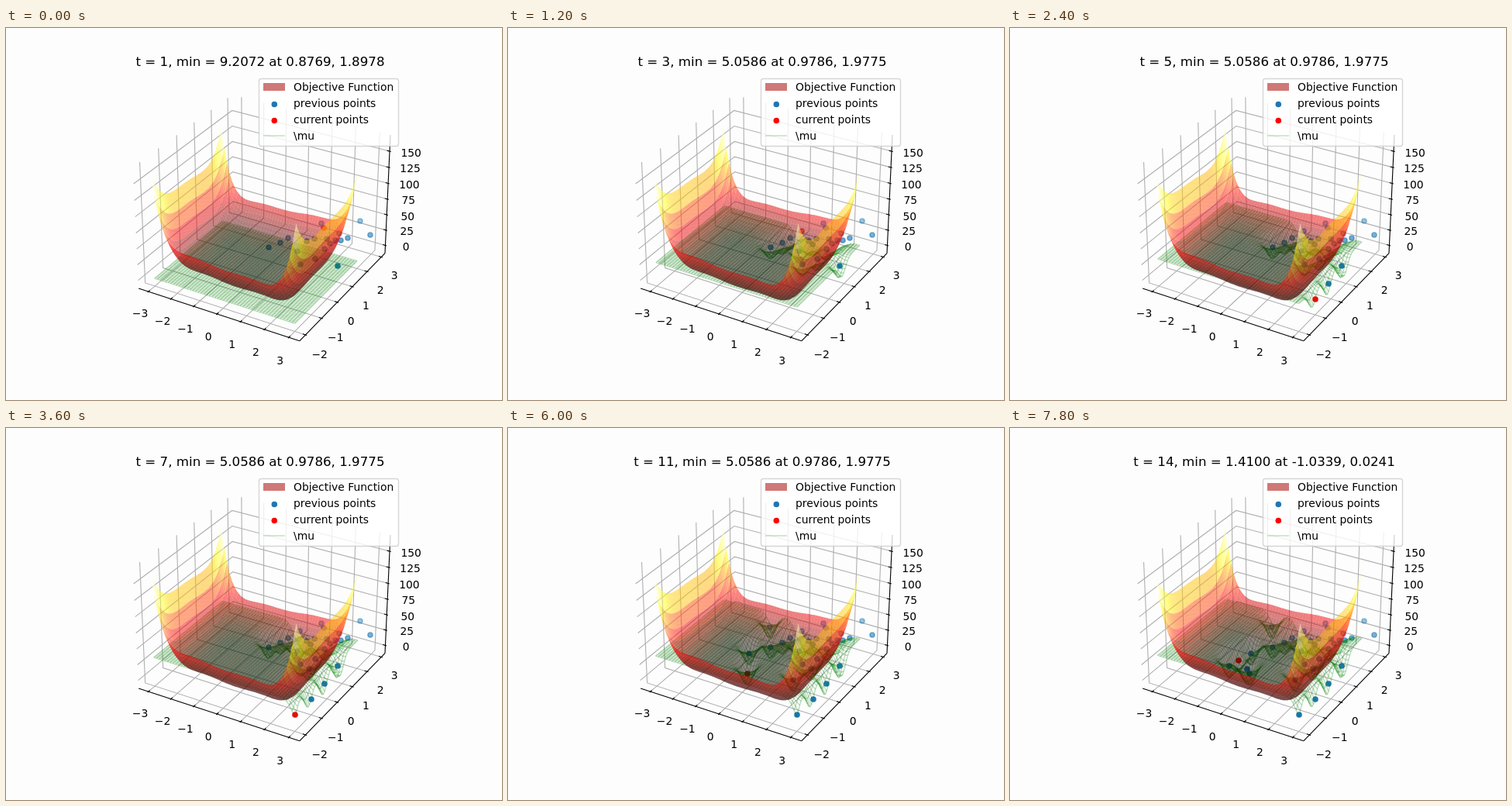
These frames come from a looping animation (640 by 480 pixels, 8 s). An HTML page with a canvas:

```html
<!DOCTYPE html>
<html lang="en">
<head>
<meta charset="utf-8">
<title>Surface search</title>
<style>
  html, body { margin: 0; width: 100%; height: 100%; overflow: hidden; background: #fdfdfd; }
  canvas { display: block; width: 640px; height: 480px; }
</style>
</head>
<body>
<canvas id="stage" width="640" height="480"></canvas>
<script>
const STEP = 600, LOOP = 8000, N = 50;
const FONT = '"DejaVu Sans", sans-serif';
const BLUE = '#1f77b4', RED = '#ff0000', GREEN = 'rgba(0,128,0,.26)';

// Box limits in data units, and data-to-box scale
const X0 = -3.4375, X1 = 3.4375, Y0 = -2.361, Y1 = 3.261, Z0 = -13, Z1 = 174.9;
const SX = 0.17316, SY = 0.2117, SZ = 0.004753, YC = 0.45, ZC = 80.9;
const CX = 333, CY = 237.4, ZOOM = 1997.8;

// Screen positions of the samples: the first set, then one per step
const first = [
  [339, 283], [354, 277], [364, 271], [380, 305], [376, 288], [388, 275], [399, 298],
  [407, 252], [411, 285], [414, 272], [418, 278], [425, 274], [430, 265], [398, 272],
  [432, 274], [441, 271], [457, 249], [470, 267], [428, 307]
];
const added = [
  [410, 258], [393, 279], [379, 262], [411, 330], [394, 350], [391, 311], [373, 370],
  [368, 325], [311, 291], [338, 257], [309, 317], [306, 311], [283, 307], [295, 300]
];

// Perspective view: elevation 30, azimuth -60
function project(x, y, z) {
  const a = x * SX, b = (y - YC) * SY, c = (z - ZC) * SZ;
  const d = 10 - (0.433 * a - 0.75 * b + 0.5 * c);
  return [
    CX + ZOOM * (0.866 * a + 0.5 * b) / d,
    CY - ZOOM * (-0.25 * a + 0.433 * b + 0.866 * c) / d,
    d
  ];
}

// Data x, y of a screen point lying on the plane of height z
function unproject([px, py], z) {
  const X = (px - CX) / ZOOM, Y = (CY - py) / ZOOM, c = (z - ZC) * SZ;
  const m = 0.866 + 0.433 * X, n = 0.5 - 0.75 * X, p = X * (10 - 0.5 * c);
  const q = -0.25 + 0.433 * Y, r = 0.433 - 0.75 * Y, s = Y * (10 - 0.5 * c) - 0.866 * c;
  const det = m * r - n * q;
  return [(p * r - n * s) / det / SX, (m * s - p * q) / det / SY + YC];
}

const camel = (x, y) =>
  (4 - 2.1 * x * x + x ** 4 / 3) * x * x + x * y + (4 * y * y - 4) * y * y;

const gx = i => -3 + 6 * i / N;
const gy = j => -2 + 4 * j / N;
const clamp = (v, lo = 0, hi = 1) => Math.min(hi, Math.max(lo, v));

// Black - red - yellow - white ramp
function hot(v) {
  const r = clamp(0.0416 + v * 2.624), g = clamp((v - 0.365) / 0.381), b = clamp((v - 0.746) / 0.254);
  return `rgb(${[r, g, b].map(k => Math.round(k * 255))})`;
}

function layer(draw) {
  const c = document.createElement('canvas');
  c.width = 640;
  c.height = 480;
  draw(c.getContext('2d'));
  return c;
}

function line(g, pts) {
  g.beginPath();
  pts.forEach(p => g.lineTo(p[0], p[1]));
  g.stroke();
}

function label(g, text, x, y, size = 13.89, align = 'center') {
  g.font = `${size}px ${FONT}`;
  g.textAlign = align;
  g.fillStyle = '#000';
  g.fillText(text, x, y);
}

// Translucent dots show a darker rim where fill and outline overlap
function dot(g, x, y, color, alpha = 1) {
  g.globalAlpha = alpha;
  g.fillStyle = g.strokeStyle = color;
  g.lineWidth = 1.39;
  g.beginPath();
  g.arc(x, y, 3.1, 0, 7);
  g.fill();
  g.stroke();
  g.globalAlpha = 1;
}

const range = (a, b, d = 1) => Array.from({ length: (b - a) / d + 1 }, (_, i) => a + i * d);
const P = pts => pts.map(p => project(...p));
const num = v => String(v).replace('-', '\u2212');

const axes = layer(g => {
  g.fillStyle = '#fdfdfd';
  g.fillRect(0, 0, 640, 480);
  const xs = range(-3, 3), ys = range(-2, 3), zs = range(0, 150, 25);

  g.strokeStyle = '#b0b0b0';
  g.lineWidth = 1.11;
  xs.forEach(x => line(g, P([[x, Y0, Z0], [x, Y1, Z0], [x, Y1, Z1]])));
  ys.forEach(y => line(g, P([[X1, y, Z0], [X0, y, Z0], [X0, y, Z1]])));
  zs.forEach(z => line(g, P([[X0, Y0, z], [X0, Y1, z], [X1, Y1, z]])));

  g.strokeStyle = '#000';
  line(g, P([[X0, Y0, Z0], [X1, Y0, Z0]]));
  line(g, P([[X1, Y0, Z0], [X1, Y1, Z0]]));
  line(g, P([[X1, Y1, Z0], [X1, Y1, Z1]]));

  function tick(inner, outer, at, text, dx, dy) {
    line(g, P([inner, outer]));
    const [px, py, d] = project(...at);
    label(g, num(text), px + dx * 10 / d, py + dy * 10 / d + 5);
  }
  xs.forEach(x => tick([x, Y0 + 0.09, Z0], [x, Y0 - 0.045, Z0], [x, Y0, Z0], x, -10.7, 28.1));
  ys.forEach(y => tick([X1 - 0.11, y, Z0], [X1 + 0.055, y, Z0], [X1, y, Z0], y, 17.5, 24));
  zs.forEach(z => tick([X1 - 0.11, Y1, z], [X1 + 0.055, Y1, z], [X1, Y1, z], z, 27.7, 1.6));
});

const bowl = layer(g => {
  const quads = [];
  for (let i = 0; i < N; i++) {
    for (let j = 0; j < N; j++) {
      const c = [[i, j], [i + 1, j], [i + 1, j + 1], [i, j + 1]]
        .map(([a, b]) => [gx(a), gy(b), camel(gx(a), gy(b))]);
      const pts = P(c);
      quads.push({
        pts,
        depth: pts.reduce((s, p) => s + p[2], 0),
        z: c.reduce((s, p) => s + p[2], 0) / 4
      });
    }
  }
  const lo = Math.min(...quads.map(q => q.z)), hi = Math.max(...quads.map(q => q.z));
  quads.sort((a, b) => b.depth - a.depth);
  g.globalAlpha = 0.5;
  for (const q of quads) {
    g.fillStyle = hot((q.z - lo) / (hi - lo));
    g.beginPath();
    q.pts.forEach(p => g.lineTo(p[0], p[1]));
    g.fill();
  }
});

const legend = layer(g => {
  g.fillStyle = 'rgba(255,255,255,.8)';
  g.strokeStyle = 'rgba(204,204,204,.8)';
  g.lineWidth = 1.39;
  g.beginPath();
  g.roundRect(326.5, 65.5, 180, 87, 3);
  g.fill();
  g.stroke();
  g.fillStyle = '#d07878';
  g.fillRect(332, 71, 28, 10);
  dot(g, 346.3, 98.5, BLUE);
  dot(g, 346.3, 119.5, RED);
  g.strokeStyle = GREEN;
  g.lineWidth = 1.39;
  line(g, [[332, 139], [360, 139]]);
  ['Objective Function', 'previous points', 'current points', '\\mu']
    .forEach((s, i) => label(g, s, 371, 81 + i * 21, 13.89, 'left'));
});

// Mean surface: a level sheet pulled down around each sample
function drawMean(g, t, samples) {
  const rise = 40.5 - 40.5 / t ** 0.9;
  const dips = samples.map(p => unproject(p, 18));
  const grid = range(0, N).map(i => range(0, N).map(j => {
    const x = gx(i), y = gy(j);
    let rest = 1;
    for (const [a, b] of dips) rest *= 1 - Math.exp(-11 * ((x - a) ** 2 + (y - b) ** 2));
    return project(x, y, rise * rest - 0.5);
  }));
  g.strokeStyle = GREEN;
  g.lineWidth = 1.39;
  g.lineJoin = 'round';
  for (let k = 0; k <= N; k++) {
    line(g, grid[k]);
    line(g, grid.map(row => row[k]));
  }
}

const best = t => t < 2 ? '9.2072 at 0.8769, 1.8978'
  : t < 14 ? '5.0586 at 0.9786, 1.9775'
  : '1.4100 at -1.0339, 0.0241';

const ctx = document.getElementById('stage').getContext('2d');

function render(t) {
  const samples = first.concat(added.slice(0, t));
  ctx.drawImage(axes, 0, 0);
  samples.forEach(([x, y], i) =>
    dot(ctx, x, y, i === samples.length - 1 ? RED : BLUE, clamp(0.45 + (y - 255) / 90, 0.45)));
  drawMean(ctx, t, samples);
  ctx.drawImage(bowl, 0, 0);
  ctx.drawImage(legend, 0, 0);
  label(ctx, `t = ${t}, min = ${best(t)}`, 328, 49, 16.67);
}

let shown = 0;
const start = performance.now();
function frame() {
  const t = 1 + Math.floor((performance.now() - start) % LOOP / STEP);
  if (t !== shown) render(shown = t);
  requestAnimationFrame(frame);
}
frame();
</script>
</body>
</html>
```
